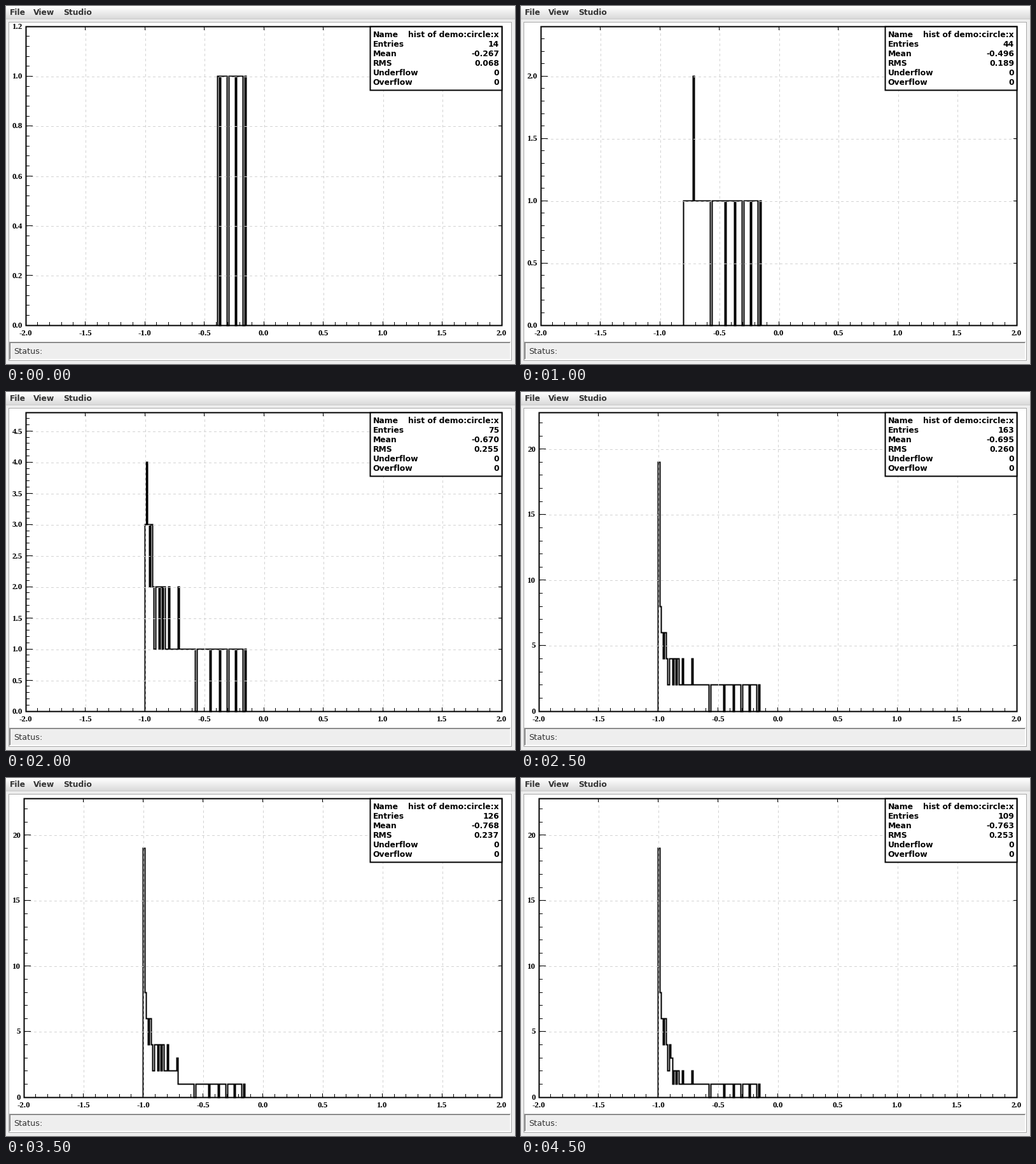
Animation, 800 px wide and 563 px high, one loop 5 s. Source, as a matplotlib script:

```python
import math

import matplotlib.pyplot as plt
import numpy as np
from matplotlib.animation import FuncAnimation
from matplotlib.patches import Rectangle

W, H, DPI = 800, 563, 100
PX = 72 / DPI
TOP, BASE, RIGHT = 32, 502, 779
BINS = 300
GRID = "#d3d3d3"

# first and last degree of the arc that is filled in at each step
ARCS = [(9, 22), (9, 36), (9, 52), (9, 67), (9, 83),
        (9, 171), (26, 171), (46, 171), (79, 171), (63, 171)]

plt.rcParams["path.simplify"] = False
fig = plt.figure(figsize=(W / DPI, H / DPI), dpi=DPI, facecolor="#eeeeee")
ax = fig.add_axes([0, 0, 1, 1])


def cell(v):
    return math.floor(v + 1e-6)


def rect(x, y, w, h, color="black"):
    ax.add_patch(Rectangle((x, y), w, h, fc=color, lw=0, antialiased=False))


def frame(x0, y0, x1, y1, fill="none"):
    """Two pixel wide outline centred on the given pixels."""
    ax.add_patch(Rectangle((x0 + 0.5, y0 + 0.5), x1 - x0, y1 - y0, fc=fill,
                           ec="black", lw=2 * PX, joinstyle="miter",
                           snap=False))


def bevel(x, y, w, h, dark, light):
    rect(x, y + h - 1, w, 1, light)
    rect(x + w - 1, y, 1, h, light)
    rect(x, y, w - 1, 1, dark)
    rect(x, y, 1, h - 1, dark)


def label(x, y, text, px=12.4, font="DejaVu Sans", weight="bold", ha="left",
          color="black"):
    ax.text(x, y, text, fontsize=px * PX, family=font, weight=weight,
            ha=ha, va="baseline", color=color)


def axis_label(x, y, text, ha):
    label(x, y, text, 13, "Liberation Serif", ha=ha)


def dashes(xs, ys):
    ax.plot(xs, ys, color=GRID, lw=PX, ls=(0, (3, 5)),
            dash_capstyle="butt", antialiased=False)


def window():
    for y in range(20):
        rect(0, y, W, 1, str(1 - 0.145 * y / 19))
    rect(0, 20, W, 1, "#cccccc")
    for x, name in ((6, "File"), (43, "View"), (90, "Studio")):
        label(x, 14, name, color="#333333")
    bevel(4, 25, 791, 533, "#a8a8a8", "#a8a8a8")
    rect(5, 26, 789, 502, "white")
    bevel(5, 528, 789, 29, "#a6a6a6", "white")
    bevel(6, 529, 787, 27, "#747474", "white")
    label(12.5, 547, "Status:", 12.8, weight="normal", color="#333333")


def steps(counts, px, py):
    used = np.flatnonzero(counts)
    first, last = used[0], used[-1]
    xs, ys = [], []
    for i in range(first, last + 2):
        x = cell(px(4 * i / BINS - 2)) + 0.5
        before = counts[i - 1] if i > first else 0
        after = counts[i] if i <= last else 0
        xs += [x, x]
        ys += [cell(py(before)) + 0.5, cell(py(after)) + 0.5]
    ax.plot(xs, ys, color="black", lw=2 * PX, snap=False,
            solid_joinstyle="miter", solid_capstyle="butt")


def axes(left, peak, px, py):
    top = 1.2 * peak
    major, fmt = (0.2, ".1f") if peak == 1 else (
        (0.5, ".1f") if peak < 5 else (5, ".0f"))
    for i in range(1, 8):
        x = cell(px(i / 2 - 2)) + 0.5
        dashes([x, x], [BASE, TOP])
    for i in range(1, int(top / major - 1e-6) + 1):
        y = cell(py(i * major)) + 0.5
        dashes([left, RIGHT], [y, y])

    frame(left, TOP, RIGHT, BASE)
    for i in range(41):
        x = cell(px(i / 10 - 2))
        size = 5 if i % 5 else 6
        rect(x, BASE - size, 1, size)
        if i % 5 == 0:
            rect(x, TOP, 1, 6)
            axis_label(px(i / 10 - 2), 518, f"{i / 10 - 2:.1f}", "center")
    for i in range(int(top / major * 5 + 1e-6) + 1):
        value = i * major / 5
        y = cell(py(value))
        if i % 5:
            rect(left, y, 6, 1)
        else:
            rect(left, y, 11, 1)
            rect(RIGHT - 5, y, 5, 1)
            axis_label(left - 5, y + 4.5, format(value, fmt), "right")


def stats(counts):
    mids = (np.arange(BINS) + 0.5) * 4 / BINS - 2
    mean = np.average(mids, weights=counts)
    rms = math.sqrt(np.average((mids - mean) ** 2, weights=counts))
    rows = [("Name", "hist of demo:circle:x"), ("Entries", str(counts.sum())),
            ("Mean", f"{mean:.3f}"), ("RMS", f"{rms:.3f}"),
            ("Underflow", "0"), ("Overflow", "0")]
    frame(572, TOP, RIGHT, 132, "white")
    for i, (name, value) in enumerate(rows):
        label(576.5, 49 + 15 * i, name)
        label(775, 49 + 15 * i, value, ha="right")


def draw(step):
    ax.clear()
    ax.set(xlim=(0, W), ylim=(H, 0))
    ax.axis("off")
    first, last = ARCS[step]
    points = -np.sin(np.radians(np.arange(first, last + 1)))
    counts = np.histogram(points, BINS, (-2, 2))[0]
    peak = counts.max()
    left = 31 if peak < 5 else 28

    def px(v):
        return left + (RIGHT - left) * (v + 2) / 4

    def py(v):
        return BASE - (BASE - TOP) * v / (1.2 * peak)

    window()
    steps(counts, px, py)
    axes(left, peak, px, py)
    stats(counts)
    for artist in ax.lines:
        artist.set_zorder(1)
    return []


anim = FuncAnimation(fig, draw, frames=len(ARCS), interval=500,
                     init_func=lambda: [], repeat=True, repeat_delay=0)
plt.show()
```
